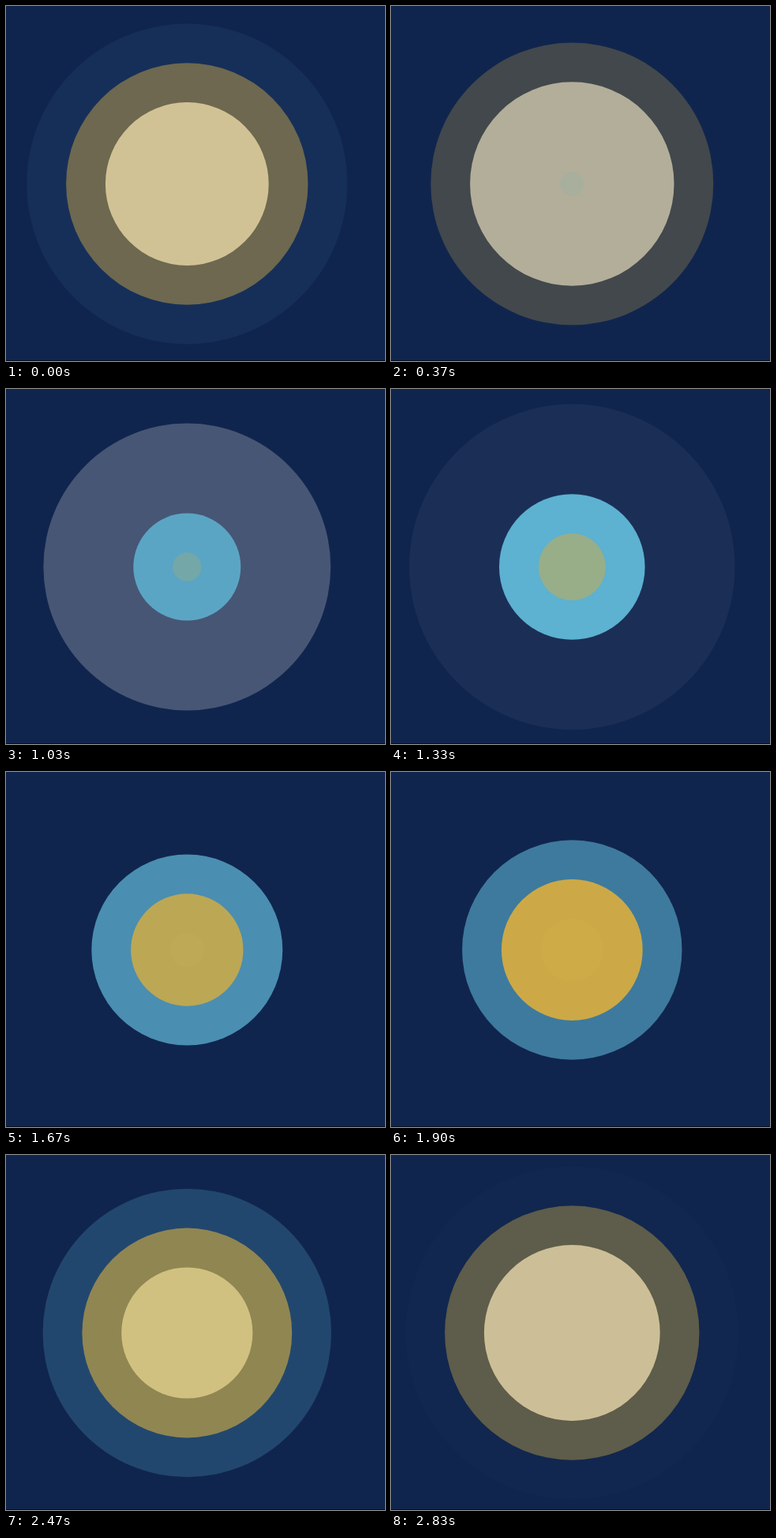
An HTML page that plays this animation: 480 by 450 pixels, repeating every 2.86 s.

```html
<!DOCTYPE html>
<html lang="en">
<head>
<meta charset="utf-8">
<title>Ripple</title>
<style>
  html, body { margin: 0; width: 100%; height: 100%; overflow: hidden; background: #10254e; }
  svg { display: block; width: 480px; height: 450px; }
</style>
</head>
<body>
<svg viewBox="0 0 480 450">
  <rect width="480" height="450" fill="#10254e"/>
  <g id="rings">
    <circle data-lag="2" cx="229.3" cy="225.5" fill="#f9f7f1"/>
    <circle data-lag="0" cx="229.3" cy="225.5" fill="#61b9d9"/>
    <circle data-lag="1" cx="229.3" cy="225.5" fill="#d2ac43"/>
  </g>
  <rect y="449" width="480" height="1" fill="#060e1e"/>
</svg>
<script>
const LOOP = 2860;
const CYCLE = 213.5;   // radius at which a ring starts over
const GAP = 49.8;      // radius difference between rings
const PEAK = 85;       // radius of full opacity
const FADE_END = 212;
// [step, radius of the leading ring]
const GROWTH = [[0, -10.5], [21, 43.7], [39, 92.3], [49, 121], [63, 157.4], [73, 182.7], [84, 211]];
const rings = [...document.querySelectorAll('#rings circle')];

// 30 steps per second on a 10 ms clock, after a longer first hold
function stepAt(ms) {
  if (ms < 70) return 0;
  const tick = Math.floor(ms / 10) * 10;
  return Math.min(84, 1 + Math.floor((tick - 63) * 3 / 100));
}

function leadRadius(step) {
  const i = Math.max(1, GROWTH.findIndex(([s]) => s >= step));
  const [s0, r0] = GROWTH[i - 1], [s1, r1] = GROWTH[i];
  return r0 + (r1 - r0) * (step - s0) / (s1 - s0);
}

function opacityAt(r) {
  return r < PEAK ? r / PEAK : Math.max(0, (FADE_END - r) / (FADE_END - PEAK));
}

function render(ms) {
  const lead = leadRadius(stepAt(ms % LOOP));
  for (const ring of rings) {
    const r = (lead - GAP * ring.dataset.lag + CYCLE) % CYCLE;
    ring.setAttribute('r', r.toFixed(2));
    ring.setAttribute('opacity', opacityAt(r).toFixed(3));
  }
}

const start = performance.now();
function tick() {
  render(performance.now() - start);
  requestAnimationFrame(tick);
}
tick();
</script>
</body>
</html>
```
